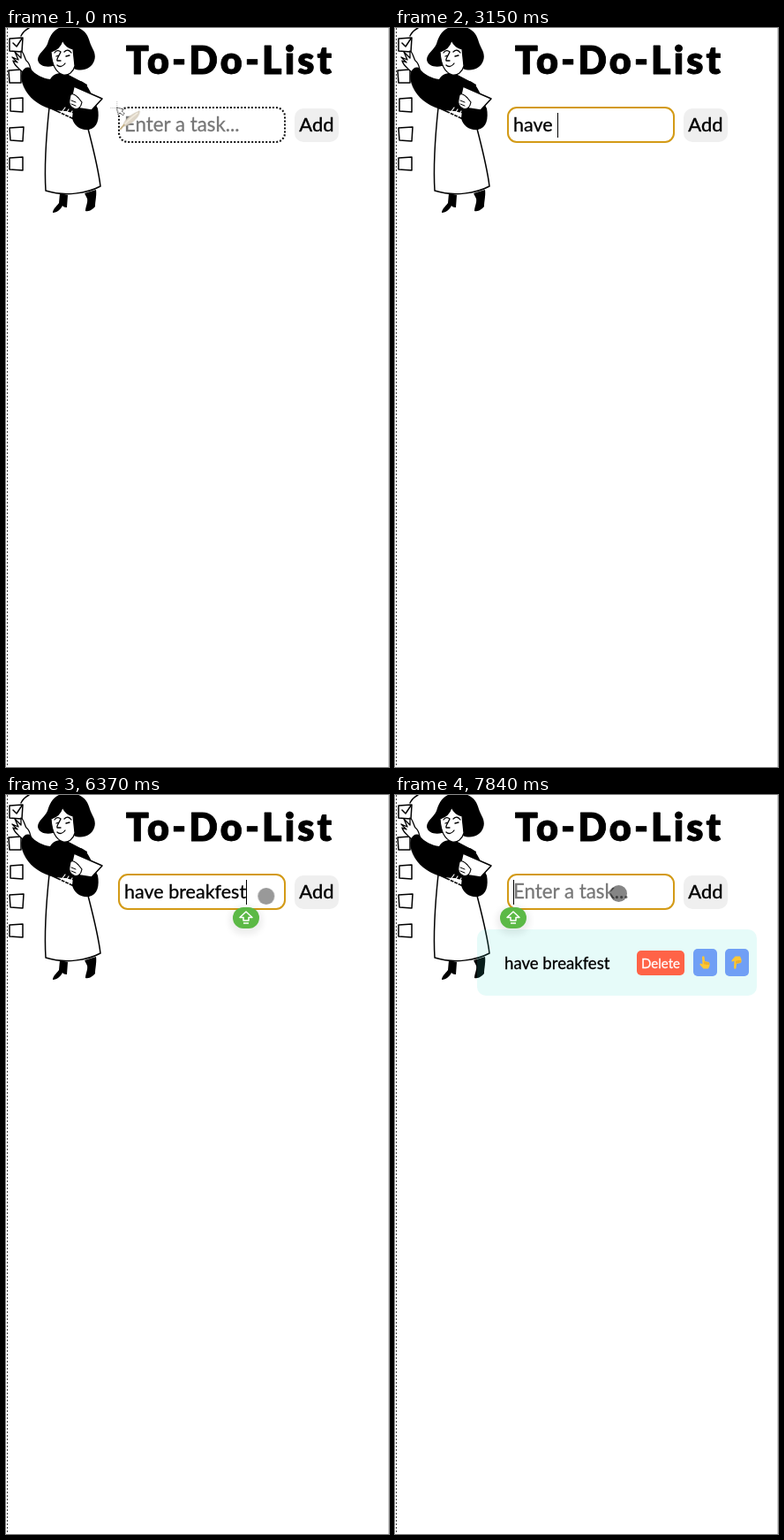
Write an HTML page that moves like this. It is 434 px wide and 836 px high and loops after 8 s.

```html
<!DOCTYPE html>
<html lang="en">
<head>
<meta charset="utf-8">
<title>To-Do-List</title>
<style>
  html, body { margin: 0; width: 100%; height: 100%; overflow: hidden; background: #fff; }
  #stage { position: relative; width: 434px; height: 836px; overflow: hidden; font-family: Lato, "Open Sans", sans-serif; }
  #stage > * { position: absolute; box-sizing: border-box; }
  svg { left: 0; top: 0; overflow: visible; }
  .edge { top: 0; height: 836px; width: 1px; }
  .left { left: 1px; background: repeating-linear-gradient(#444 0 2px, #fff 2px 4px); }
  .right { left: 433px; background: #ccc; }

  /* All timings share one 8 s loop: 1% = 80 ms */
  .loop { animation: 8s step-end infinite; }
  .glide { animation-timing-function: linear; }

  .field { left: 127px; top: 89px; width: 190px; height: 41px; border: 2px dotted #111; border-radius: 11px; animation-name: focus; }
  .line { left: 134px; top: 89px; height: 40px; line-height: 40px; font-size: 21.5px; white-space: pre; color: #000; -webkit-text-stroke: .3px; }
  .hint { font-size: 22.3px; color: #777; animation-name: hint; }
  .typed { opacity: 0; animation-name: typed; }
  .typed b { font-weight: 400; font-size: 0; animation: key 8s step-end var(--at) infinite; }
  .caret { display: inline-block; width: 1px; height: 28px; margin-right: -1px; background: #000; vertical-align: -7px; }
  .idle { animation-name: idle; }

  .add { left: 327px; top: 91px; width: 50px; height: 38px; line-height: 36px; border-radius: 10px; background: #efefef; text-align: center; font-size: 22px; -webkit-text-stroke: .4px; }
  .tap { left: 327px; top: 91px; width: 50px; height: 38px; background: rgba(40,150,212,.4); opacity: 0; animation-name: tap; }
  .item { left: 93px; top: 152px; width: 317px; height: 75px; border-radius: 10px; background: rgba(64,224,208,.13); animation-name: item; }
  .item > * { position: absolute; border-radius: 5px; }
  .item p { margin: 0; left: 31px; top: 18px; line-height: 40px; font-size: 18.6px; white-space: nowrap; -webkit-text-stroke: .3px; }
  .del { left: 181px; top: 24px; width: 54px; height: 28px; line-height: 28px; background: #ff6347; color: #fff; text-align: center; font-size: 15px; -webkit-text-stroke: .3px; }
  .move { top: 22px; width: 27px; height: 31px; background: #709ff5; }
  .up { left: 245px; }
  .down { left: 281px; }
  .move svg { position: absolute; left: 6px; top: 8px; }
  .down svg { transform: scaleY(-1); }

  .quill { animation-name: quill; }
  .dot { left: -9.5px; top: -9.5px; width: 19px; height: 19px; border-radius: 50%; background: #000; opacity: 0; animation-name: dot; }
  .badge { left: -15px; top: 127px; width: 30px; height: 24px; border-radius: 12px; background: #5cb946; box-shadow: 0 3px 7px 4px rgba(0,0,0,.07); opacity: 0; animation-name: badge; }
  .badge svg { position: absolute; left: 7px; top: 4px; }

  @keyframes key { 0% { font-size: 21.5px } 55%, 100% { font-size: 0 } }
  @keyframes focus {
    0%, 84% { border: 2px dotted #111 }
    20.125%, 93.625%, 100% { border: 2px solid #d39a16 }
  }
  @keyframes hint { 0%, 84.875%, 100% { opacity: 1 } 31.5% { opacity: 0 } }
  @keyframes typed { 0%, 84.875%, 100% { opacity: 0 } 31.5% { opacity: 1 } }
  @keyframes idle { 0%, 31.5% { opacity: 0 } 20.125%, 93.625%, 100% { opacity: 1 } }
  @keyframes item { 0% { opacity: 0 } 84.875%, 100% { opacity: 1 } }
  @keyframes tap { 0%, 83%, 87.5%, 100% { opacity: 0 } 84%, 86.5% { opacity: 1 } }
  @keyframes quill {
    0% { transform: translate(125px,90px) }
    2.625% { transform: translate(185px,52px) }
    5.25% { transform: translate(235px,82px) }
    7.875% { transform: translate(178px,124px) }
    10.5% { transform: translate(144px,91px) }
    11.375%, 18.3% { transform: translate(146px,92px) }
    20.125%, 31.5% { transform: translate(158px,103px); opacity: 1 }
    31.51%, 100% { transform: translate(158px,103px); opacity: 0 }
  }
  @keyframes dot {
    0%, 76% { opacity: 0; transform: translate(287px,117px) }
    78%, 79.625% { opacity: .4; transform: translate(294px,114px) }
    82.25%, 86.5% { opacity: .48; transform: translate(361px,111px) }
    88.4% { transform: translate(338px,155px) }
    89.6% { transform: translate(300px,184px) }
    91% { transform: translate(241px,132px) }
    91.9%, 99.99% { opacity: .48; transform: translate(253px,111px) }
    100% { opacity: 0; transform: translate(253px,111px) }
  }
  @keyframes badge {
    0%, 20% { opacity: 0; transform: translateX(134px) scale(.6) }
    21% { opacity: .4; transform: translateX(134px) scale(.77) }
    22.75%, 31.5% { opacity: 1; transform: translateX(134px) }
    32.375% { opacity: 0; transform: translateX(134px) scale(.6) }
    32.38%, 46.3% { opacity: 0; transform: translateX(184px) scale(.6) }
    48.125% { opacity: 1; transform: translateX(184px) }
    50.75% { opacity: 0; transform: translateX(196px) scale(.6) }
    50.76%, 76.125% { opacity: 0; transform: translateX(272px) scale(.6) }
    78.75%, 83.125% { opacity: 1; transform: translateX(272px) }
    84.875% { opacity: 0; transform: translateX(272px) scale(.6) }
    84.88%, 93.625% { opacity: 0; transform: translateX(134px) scale(.6) }
    96.25%, 100% { opacity: 1; transform: translateX(134px) }
  }
</style>
</head>
<body>
<div id="stage">
  <div class="edge left"></div>
  <div class="edge right"></div>

  <svg width="434" height="240" fill="none" stroke="#000" stroke-width="1.5" stroke-linecap="round" stroke-linejoin="round">
    <!-- Checkboxes -->
    <path d="M4 12L19 11L18 27L4 26ZM3 48L17 47L17 62L4 62ZM5 80L19 79L19 95L5 94ZM4 113L20 112L19 128L5 127ZM4 147L19 146L19 161L4 160Z"/>
    <path d="M8 17L12 21L18 12M17 9Q20 3 26 0"/>
    <!-- Legs -->
    <path fill="#000" stroke="none" d="M61 187L70 189L69 203C66 203 65 202 64 201C62 205 58 209 53 209C53 205 57 202 60 198ZM89 187L102 183C103 189 101 196 101 202C98 205 95 208 90 207C90 202 93 198 92 193Z"/>
    <!-- Skirt -->
    <path fill="#fff" d="M49 90C46 118 43 151 45 184C67 191 92 187 107 179C104 155 97 130 92 110Z"/>
    <!-- Raised hand -->
    <path fill="#fff" stroke-width="1.3" d="M19 50C14 45 9 42 8 37L13 39L7 33L14 36L10 27L17 34L17 26C20 27 21 34 23 37C27 40 27 43 28 47Z"/>
    <!-- Sleeves and top -->
    <g fill="#000" stroke="none">
      <path d="M18 50C15 60 22 74 32 82C42 90 54 94 68 94L88 100L92 64L73 54C65 49 54 50 50 58C42 57 33 53 28 46C25 43 20 45 18 50Z"/>
      <path d="M80 60C92 57 97 76 104 91C106 102 104 113 94 115C85 116 77 111 75 102Z"/>
    </g>
    <!-- Hair and face -->
    <path fill="#000" stroke="none" d="M70 -2C55 -2 50 8 47 18C44 25 36 29 36 36C37 43 46 45 53 43L77 46C86 50 97 46 100 37C103 28 97 23 95 16C92 5 86 -2 70 -2Z"/>
    <path fill="#fff" stroke-width="1.2" d="M51 27C57 25 62 21 64 14C67 20 71 23 76 24L78 43C76 50 71 54 65 53C58 51 52 43 51 27Z"/>
    <path stroke-width="1.3" d="M55 28C57 25 60 25 62 27M66 27C69 24 72 25 74 28M57 32L60 31M68 32L72 31M62 27C60 32 57 35 58 37L62 37M58 42C61 45 65 43 67 40"/>
    <!-- Papers and holding hand -->
    <path fill="#fff" d="M77 66L109 80L97 93L84 91L73 84Z"/>
    <path fill="#fff" stroke-width="1.2" d="M73 76C75 73 79 76 82 79L86 84C85 90 81 93 77 91C73 89 71 85 72 81Z"/>
    <path stroke-width="1" d="M74 82L79 84M74 86L79 88"/>
    <path stroke="#fff" stroke-width="1.2" d="M67 90L61 98M71 92L65 101M75 94L69 104"/>
    <text x="254" y="52" text-anchor="middle" font-size="43" font-weight="900" letter-spacing="3.1" fill="#000" stroke="#000" stroke-width=".8">To-Do-List</text>
  </svg>

  <div class="field loop"></div>
  <div class="line hint loop">Enter a task...</div>
  <div class="line idle loop"><i class="caret"></i></div>
  <div class="line typed loop"><b style="--at:2.52s">h</b><b style="--at:2.59s">a</b><b style="--at:2.8s">v</b><b style="--at:3.01s">e</b><b style="--at:3.15s"> </b><b style="--at:3.85s">b</b><b style="--at:3.99s">r</b><b style="--at:4.06s">e</b><b style="--at:4.27s">a</b><b style="--at:4.41s">k</b><b style="--at:4.9s">f</b><b style="--at:5.04s">e</b><b style="--at:5.25s">s</b><b style="--at:5.53s">t</b><i class="caret"></i></div>
  <div class="add">Add</div>
  <div class="tap loop glide"></div>

  <div class="item loop">
    <p>have breakfest</p>
    <div class="del">Delete</div>
    <div class="move up"><svg width="14" height="15"><use href="#hand"/></svg></div>
    <div class="move down"><svg width="14" height="15"><use href="#hand"/></svg></div>
  </div>

  <div class="badge loop glide">
    <svg width="16" height="16" fill="none" stroke="#fff" stroke-width="1.5" stroke-linejoin="round"><path d="M8 1L15 7.5H11V11H5V7.5H1ZM5 14H11"/></svg>
  </div>

  <svg class="quill loop glide" width="32" height="32">
    <path d="M-7 .5H-1M.5 -7V-1" stroke="#bbb" stroke-dasharray="1 1"/>
    <path d="M0 0L8 2L6 4L9 7L7 9L4 6L2 8Z" fill="#fff" stroke="#222" stroke-dasharray="2 .7"/>
    <path d="M8 21C8 15 14 9 26 4C26 10 19 17 10 21Z" fill="#ded6c8" stroke="#c6bcab" stroke-width=".7"/>
    <path d="M4 25C10 17 16 12 24 6" fill="none" stroke="#f7f1e4" stroke-width="1.4"/>
    <path d="M4 25L9 19" stroke="#b39a62" stroke-width="1.2"/>
  </svg>
  <div class="dot loop glide"></div>

  <svg width="0" height="0">
    <defs>
      <g id="hand">
        <path d="M4 1Q5.5 -.5 6.5 1L7 6L11.5 7Q13 8 12.5 11L11 14.5H5.5L1.5 10Q1 8.5 2.5 8.5L4.5 9.5Z" fill="#fdc735"/>
        <path d="M7 6.5V9.5M9 7V10M11 7.5V10" stroke="#d98d1c" stroke-width=".8"/>
      </g>
    </defs>
  </svg>
</div>
</body>
</html>
```
